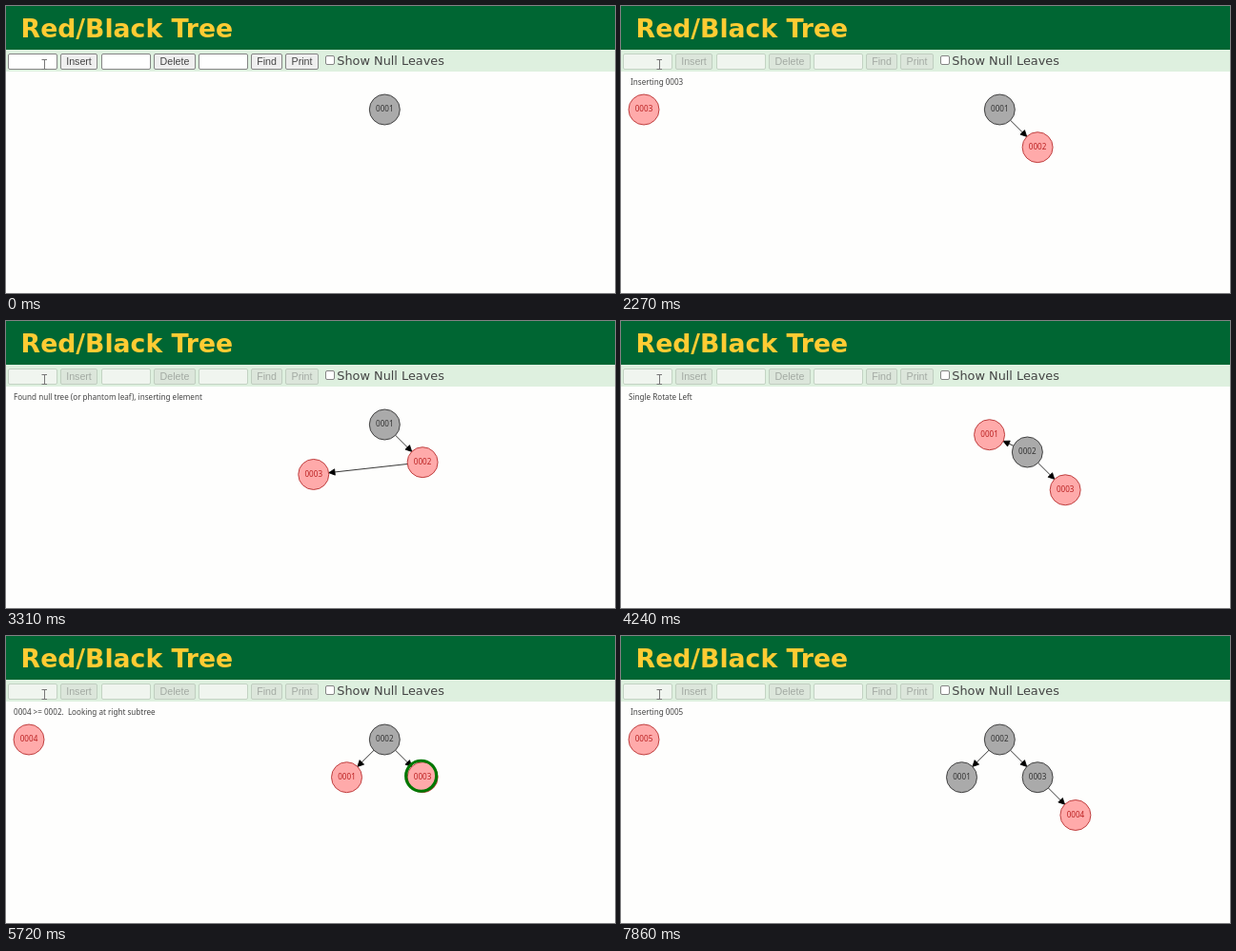
Animation of 639 by 302 pixels, one loop 8000 ms. Source, as an HTML page with a canvas:

```html
<!DOCTYPE html>
<html lang="en">
<head>
<meta charset="utf-8">
<title>Red/Black Tree</title>
<style>
html, body { margin: 0; width: 639px; height: 302px; overflow: hidden; background: #fefefd; }
body { position: relative; }
body * { position: absolute; box-sizing: border-box; white-space: pre; }
h1 { margin: 0; padding-left: 15.6px; width: 639px; height: 46px; background: #063;
  font: bold 26.7px/48px "DejaVu Sans", sans-serif; color: #fc3; }
#bar { top: 46px; width: 639px; height: 23px; background: #def0df; }
#bar * { top: 4px; height: 17px; border: 1px solid #858585; border-radius: 2px;
  font: 10.67px/15px "Liberation Sans", Arial, sans-serif; color: #444; }
.field { width: 52px; background: #fff; padding-left: 3px; }
.button { background: #efefef; text-align: center; }
#bar.busy .field { background: #f0f5ef; border-color: #c3d3c3; }
#bar.busy .button { background: #dce6db; border-color: #c0cec0; color: #a3aaa3; }
#bar .focus { border: 2px solid #111; line-height: 13px; padding-left: 2px; }
#bar .box { left: 335px; top: 5.5px; width: 10px; height: 10px; background: #fff; }
#bar .label { left: 347.3px; top: 0; height: 23px; border: 0;
  font: 12.85px/23px "DejaVu Sans", sans-serif; }
</style>
</head>
<body>
<h1>Red/Black Tree</h1>
<div id="bar">
  <div class="field" id="entry" style="left:2px"></div>
  <div class="button" style="left:57px;width:39px">Insert</div>
  <div class="field" style="left:100px"></div>
  <div class="button" style="left:155px;width:44px">Delete</div>
  <div class="field" style="left:202px"></div>
  <div class="button" style="left:257px;width:33px">Find</div>
  <div class="button" style="left:293px;width:35px">Print</div>
  <div class="box"></div>
  <div class="label">Show Null Leaves</div>
</div>
<canvas id="stage" width="639" height="302"></canvas>
<script>
const LOOP = 8000, RADIUS = 16;
const bar = document.getElementById("bar"), entry = document.getElementById("entry");
const ctx = document.getElementById("stage").getContext("2d");

// Places in the tree
const START = [24, 109], ROOT = [397.3, 109], LEFT = [357.5, 148.7], RIGHT = [437.1, 148.7],
  DEEP = [476.9, 188.5];
const ROTATE = 4138, ROTATED = 4520, PUSH = 6750, DONE = 7270;

const inserts = [
  { value: 2, focus: 340, typed: 580, start: 680, end: 1650 },
  { value: 3, focus: 1960, typed: 2130, start: 2240, end: 4550 },
  { value: 4, focus: 4750, typed: 4960, start: 5030, end: DONE },
  { value: 5, focus: 7510, typed: 7720, start: 7830, end: LOOP }
];

// moves: [from time, to time, from place, to place]; red, lit: time spans
const nodes = {
  1: { born: 0, moves: [[ROTATE, ROTATED, ROOT, LEFT]], red: [[ROTATE, PUSH]],
       lit: [[930, 991], [2480, 2560]] },
  2: { born: 680, moves: [[991, 1370, START, RIGHT], [ROTATE, ROTATED, RIGHT, ROOT]],
       red: [[0, ROTATE], [PUSH, DONE]], lit: [[930, 991], [2945, 3061], [5270, 5350]] },
  3: { born: 2240, moves: [[3061, 3440, START, DEEP], [ROTATE, ROTATED, DEEP, RIGHT]],
       red: [[0, PUSH]], lit: [[2480, 2560], [2945, 3061], [5735, 5861]] },
  4: { born: 5030, moves: [[5861, 6240, START, DEEP]], red: [[0, LOOP]],
       lit: [[5270, 5350], [5735, 5861]] },
  5: { born: 7830, moves: [[LOOP, LOOP + 1, START, START]], red: [[0, LOOP]], lit: [] }
};
const edges = [
  { from: 1, to: 2, span: [991, ROTATE], lit: [3930, ROTATE] },
  { from: 2, to: 1, span: [ROTATE, LOOP] },
  { from: 2, to: 3, span: [3061, LOOP] },
  { from: 3, to: 4, span: [5861, LOOP] }
];
const rings = [[2560, 2945, ROOT, RIGHT], [5350, 5735, ROOT, RIGHT]];

const pad = n => String(n).padStart(4, "0");
const compare = (a, b) => `${pad(a)} >= ${pad(b)}.  Looking at right subtree`;
const found = "Found null tree (or phantom leaf), inserting element";
const bothRed = "Node and parent are both red.  ";
const messages = [
  [0, ""], [680, " Inserting 0002"], [930, compare(2, 1)], [991, found], [1650, ""],
  [2240, " Inserting 0003"], [2480, compare(3, 1)], [2945, compare(3, 2)], [3061, found],
  [3720, bothRed + "Node is right child, parent is right child\nCan fix extra redness with a single rotation"],
  [3930, "Single Rotate Left"], [4550, ""],
  [5030, " Inserting 0004"], [5270, compare(4, 2)], [5735, compare(4, 3)], [5861, found],
  [6510, bothRed + "Uncle of node is red -- push blackness down from grandparent"],
  [7000, "Root of the tree is red.  Color it black."], [DONE, ""], [7830, " Inserting 0005"]
];

const within = (t, [a, b]) => t >= a && t < b;
const during = (t, spans) => spans.some(s => within(t, s));

function travel(t, [t0, t1, from, to]) {
  const k = Math.min(1, Math.max(0, (t - t0) / (t1 - t0)));
  return from.map((v, i) => v + (to[i] - v) * k);
}
function place(t, { moves }) {
  return travel(t, moves.filter(m => t >= m[0]).pop() || moves[0]);
}
function pulse(t) {
  const period = 2240, phase = (t - 2960 + 2.5 * period) % period;
  return 0.8 * (7 - Math.abs(phase - period / 2) / 280);
}

function circle([x, y], r) {
  ctx.beginPath();
  ctx.arc(x, y, r, 0, 2 * Math.PI);
}
function arrow(a, b, color, width) {
  const angle = Math.atan2(b[1] - a[1], b[0] - a[0]);
  const tip = Math.hypot(b[0] - a[0], b[1] - a[1]) - RADIUS;
  ctx.save();
  ctx.translate(...a);
  ctx.rotate(angle);
  ctx.strokeStyle = ctx.fillStyle = color;
  ctx.lineWidth = width;
  ctx.beginPath();
  ctx.moveTo(RADIUS, 0);
  ctx.lineTo(tip, 0);
  ctx.stroke();
  ctx.beginPath();
  ctx.moveTo(tip, 0);
  ctx.lineTo(tip - 6.4, -3.2);
  ctx.lineTo(tip - 6.4, 3.2);
  ctx.closePath();
  ctx.stroke();
  ctx.fill();
  ctx.restore();
}
function drawNode(t, key) {
  const node = nodes[key], at = place(t, node), red = during(t, node.red);
  if (during(t, node.lit)) {
    ctx.fillStyle = "#f00";
    circle(at, RADIUS + pulse(t));
    ctx.fill();
  }
  ctx.fillStyle = red ? "#faa" : "#aaa";
  ctx.strokeStyle = red ? "#b83030" : "#333";
  ctx.lineWidth = 0.9;
  circle(at, RADIUS);
  ctx.fill();
  ctx.stroke();
  ctx.fillStyle = red ? "#b22" : "#333";
  ctx.textAlign = "center";
  ctx.fillText(pad(key), at[0], at[1] + 2.3);
}
function drawCursor() {
  ctx.strokeStyle = "#777";
  ctx.lineWidth = 1;
  ctx.beginPath();
  for (const y of [56.5, 66.5]) {
    ctx.moveTo(37.5, y);
    ctx.lineTo(43, y);
  }
  ctx.moveTo(40.5, 57);
  ctx.lineTo(40.5, 67);
  ctx.stroke();
}

function drawControls(t) {
  const job = inserts.find(i => within(t, [i.focus, i.end]));
  const busy = !!job && t >= job.start, focus = !!job && !busy;
  bar.classList.toggle("busy", busy);
  entry.classList.toggle("focus", focus);
  entry.textContent = focus && t >= job.typed ? job.value : "";
  if (focus) {
    ctx.fillStyle = "#000";
    ctx.fillRect(t >= job.typed ? 11 : 6, 53, 1, 11);
  }
}

function draw(t) {
  ctx.clearRect(0, 0, 639, 302);
  ctx.font = '8.1px "Noto Sans", "Open Sans", sans-serif';
  drawControls(t);
  drawCursor();

  ctx.fillStyle = "#444";
  ctx.textAlign = "left";
  const text = messages.filter(m => t >= m[0]).pop()[1];
  text.split("\n").forEach((line, i) => ctx.fillText(line, 8, 83 + 10 * i));

  for (const { from, to, span, lit } of edges) {
    if (!within(t, span)) continue;
    const a = place(t, nodes[from]), b = place(t, nodes[to]);
    if (lit && within(t, lit)) arrow(a, b, "#f00", pulse(t));
    arrow(a, b, "#000", 0.75);
  }
  for (const key in nodes) if (t >= nodes[key].born) drawNode(t, key);
  for (const ring of rings) {
    if (!within(t, ring)) continue;
    ctx.strokeStyle = "#070";
    ctx.lineWidth = 3.2;
    circle(travel(t, ring), RADIUS);
    ctx.stroke();
  }
}

const begin = performance.now();
function tick() {
  draw((performance.now() - begin) % LOOP);
  requestAnimationFrame(tick);
}
tick();
</script>
</body>
</html>
```
